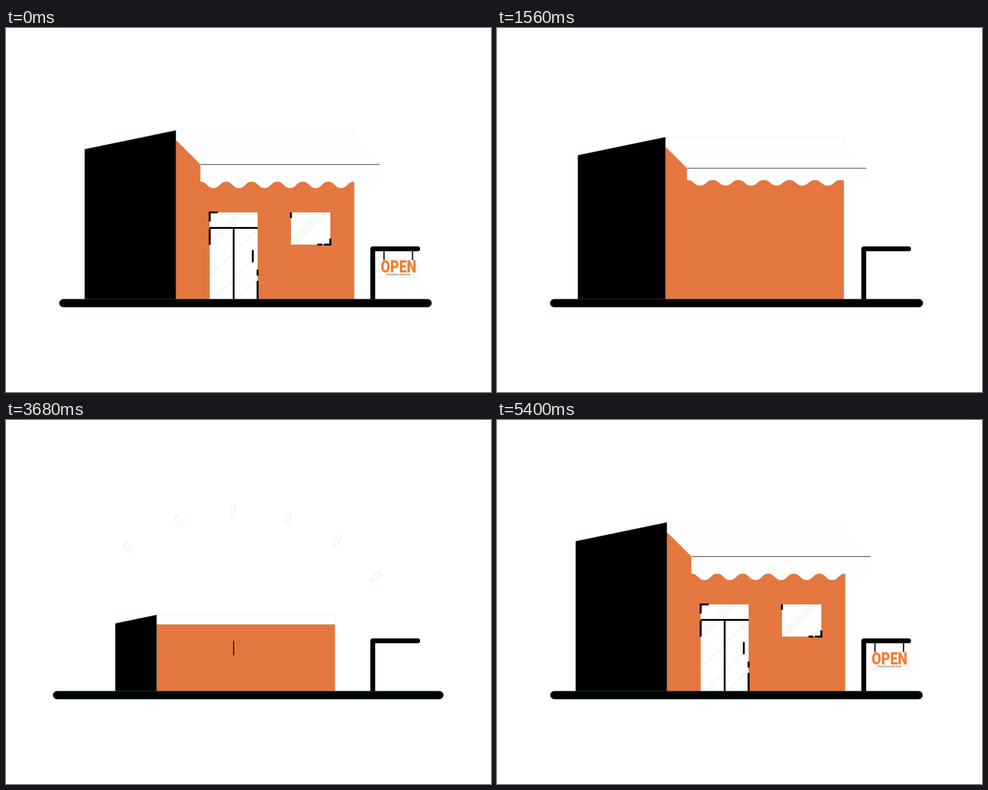
An HTML page that plays this animation: 800x600 px, repeating every 5440 ms.

```html
<!DOCTYPE html>
<html lang="en">
<head>
<meta charset="utf-8">
<title>Shop</title>
<style>
html, body { margin: 0; width: 100%; height: 100%; overflow: hidden; background: #fff; }
svg { display: block; width: 800px; height: 600px; }
.pale { fill: #fefefe; stroke: #dcf0ee; }
.ink { fill: none; stroke: #000; }
.edged { stroke: #123f40; stroke-width: .8; }
.glare { stroke: #d2ebe8; }
text { font-family: Roboto, "Liberation Sans", sans-serif; text-anchor: middle; }
</style>
</head>
<body>
<svg viewBox="0 0 800 600">
  <defs>
    <clipPath id="doorClip"><rect id="doorHole"/></clipPath>
    <clipPath id="windowClip"><rect id="windowHole"/></clipPath>
  </defs>
  <g id="effects"></g>
  <path id="front" fill="#e4773f"/>
  <path id="parapet" fill="#fdfefe" stroke="#e9f1f1" stroke-width=".8"/>
  <path id="side" class="edged"/>
  <path id="awning" fill="#fefefe" stroke="#f3f6f6" stroke-width=".7"/>
  <path id="fold" class="ink" stroke-width="2" style="stroke:#8c8c8c"/>
  <g id="doorGroup">
    <rect id="door" fill="#fff"/>
    <g id="doorGlare" class="glare" clip-path="url(#doorClip)"></g>
    <path id="bars" class="ink" stroke-width="3"/>
    <path id="handle" class="ink" stroke-linecap="round"/>
    <path id="doorFrame" class="ink" stroke-width="3.2" pathLength="100"/>
  </g>
  <g id="windowGroup">
    <rect id="window" fill="#fff"/>
    <g id="windowGlare" class="glare" clip-path="url(#windowClip)"></g>
    <path id="windowFrame" class="ink" stroke-width="3.2" pathLength="100"/>
  </g>
  <g id="sign">
    <path class="ink" d="M-24 0V12.8M23 0V12.8" stroke-width="2"/>
    <rect x="-32" y="12.8" width="64" height="22.4" fill="#fff" stroke="#e9e9e9" stroke-width=".8"/>
    <text y="29.2" font-size="22.6" font-weight="900" fill="#f57c2e">OPEN</text>
    <text y="33.2" font-size="4.7" fill="#555">Everyone welcome</text>
    <rect id="shade" x="-32" y="12.8" width="64" height="22.4" fill="#12313a"/>
  </g>
  <path id="post" class="ink" d="M605 447V364H679" stroke-width="8" stroke-linecap="round" stroke-linejoin="round"/>
  <rect id="ground" class="edged" y="447" height="13" rx="6.5"/>
</svg>
<script>
const LOOP = 5440, STEP = 40, BASE = 447;
const $ = id => document.getElementById(id);
const set = (el, attrs) => { for (const k in attrs) el.setAttribute(k, attrs[k]); };
const show = (el, on) => el.setAttribute("visibility", on ? "visible" : "hidden");
const make = (tag, parent, attrs) => {
  const el = document.createElementNS("http://www.w3.org/2000/svg", tag);
  set(el, attrs);
  return parent.appendChild(el);
};
const lerp = (a, b, u) => a + (b - a) * u;
const ramp = (t, from, to) => Math.max(0, Math.min(1, (t - from) / (to - from)));
const easeIn = (u, power = 2) => u ** power;
const easeOut = (u, power = 2) => 1 - (1 - u) ** power;
const smooth = u => u * u * (3 - 2 * u);
const backOut = u => 1 - 4.4 * (1 - u) ** 3 + 3.4 * (1 - u) ** 2;

// 1 while the building stands, 0 while it is folded into the ground
const standing = t => t < 2800 ? 1 - easeIn(ramp(t, 1400, 2200)) : easeOut(ramp(t, 3400, 4480));
const unrolled = t => t < 2800 ? 1 - easeIn(ramp(t, 1400, 1860)) : easeOut(ramp(t, 3760, 4286));
const posted = t => t < 2800 ? 1 - easeIn(ramp(t, 1680, 2520), 3) : smooth(ramp(t, 2960, 3680));
const opened = (t, closeAt, openAt) =>
  backOut(t < 2800 ? 1 - ramp(t, closeAt, closeAt + 466) : ramp(t, openAt, openAt + 466));
const detailed = t => t < 2800 ? 1 - ramp(t, 920, 1120) : ramp(t, 4100, 4480);

// The sign hangs like a damped pendulum, seen from the front.
function signAngle(t) {
  if (t < 2800) return Math.PI / 2 * smooth(ramp(t, 980, 1380));
  const s = Math.max(0, t - 4060) / 1000;
  return Math.PI / 2 * Math.exp(-2 * s) * Math.cos(2 * Math.PI * s / .74);
}

function drawBuilding(t) {
  const r = standing(t), stretch = .075 * Math.sin(Math.PI * ramp(t, 3760, 4480));
  const height = 278 * (r + stretch * r), corner = 280 - 58 * (1 - r);
  const left = corner - 150 * r, right = corner + 295 + 110 * stretch;
  const top = BASE - height, rim = Math.min(top + 15, BASE);
  set($("side"), { d: `M${left} ${BASE}V${top + 31 * r}L${corner} ${top}V${BASE}z` });
  set($("front"), { d: `M${corner} ${BASE}V${rim}H${right}V${BASE}z` });
  set($("parapet"), { d: `M${corner} ${top}H${right}V${BASE}V${rim}H${corner}` });
  for (const id of ["side", "front", "parapet"]) show($(id), r > 0);
  drawAwning(unrolled(t), corner, right, rim);

  const spread = (1 - r) ** 1.4, x = 88 - 24 * spread;
  set($("ground"), { x, width: 702 + 45 * spread - x });
}

function drawAwning(a, corner, right, rim) {
  const x0 = corner + 41 * a, x1 = right + 41 * a, y = rim + 41 * a;
  const half = (x1 - x0) / 14, depth = 10.5 * a;
  const curve = dy => `c${half / 2} 0 ${half / 2} ${dy} ${half} ${dy}`;
  const hem = (curve(depth) + curve(-depth)).repeat(7);
  show($("awning"), a > 0);
  show($("fold"), a > 0);
  set($("awning"), { d: `M${corner} ${rim}L${x0} ${y}v${28 * a ** 3}${hem}V${y}L${right} ${rim}` });
  set($("fold"), { d: `M${x0} ${y}H${x1}` });
}

// Frame dashes as percent of the outline: start, length, sliding direction.
const doorDashes = [[0, 3, 1], [39, 2.2, -1], [43.2, 6.8, 1], [88, 6, -1], [96.6, 3.4, -1]];
const paneDashes = [[45.8, 8.7, 1], [55.5, 3.5, 1], [96.2, 3.8, -1]];

function dashArray(dashes, u, slide) {
  let at = 0;
  const parts = [0];
  for (const [start, length, dir] of dashes) {
    const from = start + dir * slide * u, size = lerp(length, 2.9, u);
    parts.push(Math.max(0, from - at), size);
    at = from + size;
  }
  return [...parts, 100].join(" ");
}

// Narrow openings grow taller, wide ones flatter.
function drawOpening(name, s, box, dashes, slide, loose) {
  const { x, y, width, height } = box;
  show($(name + "Group"), s > .01);
  set($(name), box);
  set($(name + "Hole"), box);
  set($(name + "Frame"), {
    d: `M${x} ${y}h${width}v${height}h${-width}z`,
    "stroke-dasharray": dashArray(dashes, loose, slide),
    opacity: ramp(s, .5, .8)
  });
}

const flex = (s, power) => Math.max(s, .15) ** -power;

function drawDoor(t) {
  const s = Math.max(0, opened(t, 920, 4085)), grow = detailed(t);
  const loose = t < 2800 ? ramp(t, 920, 1160) : 1 - easeOut(ramp(t, 4200, 5000), 3);
  const width = 79 * s, height = 143 * flex(s, .2), x = 375.5 - width / 2, y = BASE - height;
  drawOpening("door", s, { x, y, width, height }, doorDashes, 13, loose);

  const transom = y + height * .178;
  show($("bars"), grow > 0);
  set($("bars"), { d: `M375.5 ${BASE}V${lerp(BASE, transom, grow)}M${x} ${transom}h${width * ramp(grow, .33, 1)}` });
  const grip = t < 2800 ? 18 * grow : 22 - 4 * grow;
  show($("handle"), grip > 0);
  set($("handle"), { d: `M${375.5 + width * .4} ${376 - grip / 2}v${grip}`, "stroke-width": Math.min(3, 1.5 + 1.5 * s) });

  const p = Math.max(0, opened(t, 1040, 4111)), w = 65 * p;
  const pane = { x: 502.5 - w / 2, y: 304 + 6 * (1 - Math.min(p, 1)), width: w, height: 53 * flex(p, .08) };
  drawOpening("window", p, pane, paneDashes, 9, loose);
}

function drawStreet(t) {
  const angle = signAngle(t), face = Math.cos(angle), tilt = Math.abs(Math.sin(angle));
  show($("sign"), face > .02);
  set($("sign"), { transform: `translate(647.5 367) scale(${1 + .08 * tilt} ${1.25 * face})` });
  set($("shade"), { opacity: .5 * ramp(tilt, .7, .93) });
  const length = 157 * posted(t);
  show($("post"), length > .5);
  set($("post"), { "stroke-dasharray": `${length} 400` });
}

const fx = $("effects");
const pieces = (count, build) => Array.from({ length: count }, (_, i) =>
  ({ ...build(i), el: make("rect", fx, { class: "pale" }) }));

const trails = pieces(5, i => ({ x: 276.8 + 63 * i, start: 1800 + 40 * i }));
const fan = (x, y, inner, outer, width, first) =>
  pieces(4, i => ({ x, y, inner, outer, width, angle: first + 38.5 * i }));
const rays = [...fan(568, 200, 64, 132, 10, 0), ...fan(152, 226, 36, 76, 6.5, -96)];
const confetti = pieces(6, i => ({ angle: -40 + 17.6 * i, far: 480 - 8 * i }));

function drawEffects(t) {
  for (const { el, x, start } of trails) {
    const age = t - start;
    const top = 190 - 45 * ramp(age, 0, 80) + 110 * easeIn(ramp(age, 80, 240));
    const bottom = 192 + 63 * ramp(age, 80, 136);
    show(el, age > 0 && bottom > top);
    set(el, { x, y: top, width: 2.4, height: Math.max(0, bottom - top), rx: 1 });
  }
  const tail = ramp(t, 4120, 4320), head = easeOut(ramp(t, 3720, 4120));
  for (const { el, x, y, inner, outer, width, angle } of rays) {
    const near = lerp(inner, outer, tail), far = lerp(inner, outer, head);
    show(el, head > 0 && tail < 1);
    set(el, { x: -width / 2, y: -far, width, height: Math.max(0, far - near), rx: width / 2,
      transform: `translate(${x} ${y}) rotate(${angle})` });
  }
  const reach = easeOut(ramp(t, 3500, 4120), 3), size = 18 * (1 - ramp(t, 3920, 4400));
  for (const { el, angle, far } of confetti) {
    show(el, reach > 0 && size > 0);
    set(el, { x: -3.5, y: -far * reach - size / 2, width: 7, height: size, rx: 1.5,
      transform: `translate(400 ${BASE}) rotate(${angle})` });
  }
}

const glareOffsets = [0, 6, 12, 60, 104, 140];
for (const [id, sum] of [["doorGlare", 686], ["windowGlare", 820]])
  for (const offset of glareOffsets)
    make("line", $(id), { x1: sum + offset - 260, y1: 260, x2: sum + offset - 450, y2: 450 });

function frame() {
  const t = Math.floor((performance.now() - began) % LOOP / STEP) * STEP;
  drawEffects(t);
  drawBuilding(t);
  drawDoor(t);
  drawStreet(t);
  requestAnimationFrame(frame);
}
const began = performance.now();
frame();
</script>
</body>
</html>
```
